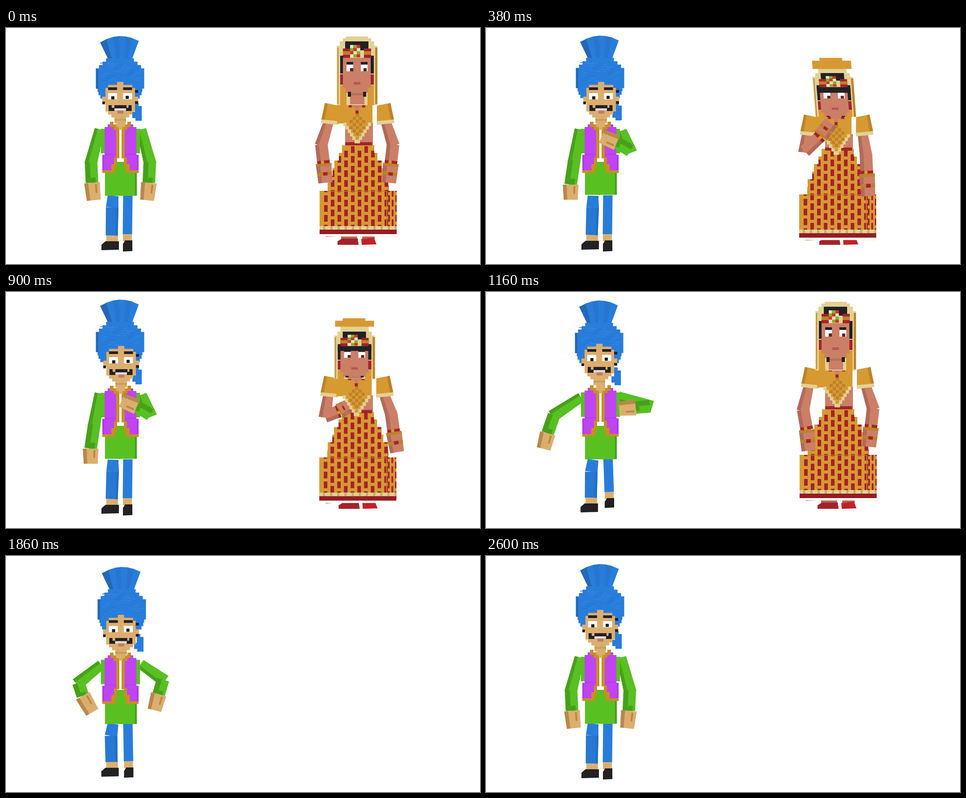
Write an HTML page with a canvas that moves like this. It is 1058 px wide and 529 px high and loops after 2620 ms.

```html
<!DOCTYPE html>
<html>
<head>
<meta charset="utf-8">
<title>Two dancers</title>
<style>
html, body { margin: 0; width: 100%; height: 100%; overflow: hidden; background: #fff; }
canvas { display: block; width: 100vw; height: 100vh; }
</style>
</head>
<body>
<canvas id="stage" width="1058" height="529"></canvas>
<script>
const LOOP = 2620, WOMAN_END = 1300;
const g = document.getElementById('stage').getContext('2d');
const BLUE = '#287ddb', NAVY = '#2269b8', GREEN = '#58c021', MOSS = '#45a11a', PURPLE = '#c044f2',
  GOLD = '#c6901f', SKIN = '#dcae6e', TAN = '#b88849', BLACK = '#222124',
  ORANGE = '#d79932', OCHRE = '#bd822a', CREAM = '#e3d194', RED = '#a6222a', ROSE = '#cb7f67', CLAY = '#b3695a';

function poly(color, ...p) {
  g.fillStyle = color;
  g.beginPath();
  for (let i = 0; i < p.length; i += 2) g.lineTo(p[i], p[i + 1]);
  g.fill();
}
function rect(color, ...boxes) {
  g.fillStyle = color;
  for (let i = 0; i < boxes.length; i += 4) g.fillRect(...boxes.slice(i, i + 4));
}
// Centred rows of blocks, given by half width.
function rows(color, cx, y, h, halves) {
  g.fillStyle = color;
  g.beginPath();
  halves.forEach((w, i) => g.rect(cx - w, y + i * h, w * 2, h + .3));
  g.fill();
}
function placed(x, y, draw, lean = 0) {
  g.save();
  g.transform(1, 0, lean, 1, x, y);
  draw();
  g.restore();
}
function twin(cx, draw) {
  draw();
  g.save();
  g.transform(-1, 0, 0, 1, 2 * cx, 0);
  draw();
  g.restore();
}
const mix = (a, b, k) => a + (b - a) * k;
const mirror = (points, cx) => points.map((v, i) => i % 2 ? v : 2 * cx - v);

// Returns a painter for any part of a tapered block: u runs across it, v along it.
function block(x0, y0, x1, y1, w0, w1, extra = 0) {
  const len = Math.hypot(x1 - x0, y1 - y0), dx = (x1 - x0) / len, dy = (y1 - y0) / len;
  const at = (u, v) => {
    const d = v * (len + extra), w = mix(w0, w1, v) * (.5 - u);
    return [x0 + dx * d - dy * w, y0 + dy * d + dx * w];
  };
  return (color, u0 = 0, u1 = 1, v0 = 0, v1 = 1) =>
    poly(color, ...at(u0, v0), ...at(u1, v0), ...at(u1, v1), ...at(u0, v1));
}
// arm = shoulder, elbow, wrist, fingertips
function upperArm(a, light, dark, bend) {
  const paint = block(...a.slice(0, 4), 22, 28, bend);
  paint(light);
  paint(dark, 0, .3);
}
const foreArm = a => block(...a.slice(2, 6), 28, 28);
const fist = a => block(...a.slice(4, 8), 35, 31);

// Keys interpolate with monotone cubics, so held poses never overshoot.
function sample(keys, t) {
  let i = 0;
  while (i < keys.length - 2 && t > keys[i + 1][0]) i++;
  const [t0, a] = keys[i], [t1, b] = keys[i + 1];
  const [tp, p] = keys[i - 1] || keys[i], [tn, n] = keys[i + 2] || keys[i + 1];
  const h = t1 - t0, u = Math.min(1, (t - t0) / h);
  const tangent = (x, y) => x * y > 0 ? 2 * x * y / (x + y) : 0;
  const out = {};
  for (const k in a) out[k] = a[k].map((v, j) => {
    const d = (b[k][j] - v) / h;
    const m0 = tangent(tp < t0 ? (v - p[k][j]) / (t0 - tp) : 0, d);
    const m1 = tangent(d, tn > t1 ? (n[k][j] - b[k][j]) / (tn - t1) : 0);
    return mix(v, b[k][j], u * u * (3 - 2 * u)) + h * u * (1 - u) * (m0 * (1 - u) - m1 * u);
  });
  return out;
}

// ---- man ----
// hat, face: offset; body: vest drop, hem y
// legs: left knee, left ankle, right hip y, right ankle, extra shoe length
const hang = [209, 227, 190, 301, 192, 347, 196, 386];
const bent = [210, 249, 161, 287, 175, 324, 190, 360];
const idle = {
  hat: [0, 0], face: [0, 0], body: [0, 377], legs: [237, 402, 236, 465, 376, 271, 462, 0],
  armL: hang, armR: mirror(hang, 255.5)
};
const chest = { ...idle,
  hat: [0, -1], face: [2, 0], body: [0, 375], legs: [238, 402, 236, 464, 375, 271, 462, 0],
  armL: [209, 227, 197, 297, 189, 351, 189, 385], armR: [303, 230, 322, 275, 292, 257, 258, 243]
};
const step = {
  hat: [-2, 1], face: [-2, -5], body: [-1, 376], legs: [235, 403, 234, 461, 362, 275, 448, -3],
  armL: [212, 236, 152, 276, 138, 317, 129, 352], armR: [296, 234, 366, 256, 334, 259, 297, 262]
};
const reach = { ...step, armL: [212, 236, 138, 262, 106, 290, 84, 308] };
const crouch = {
  hat: [3, 18], face: [-1, 25], body: [11, 383], legs: [230, 411, 233, 460, 372, 277, 459, 14],
  armL: bent, armR: mirror(bent, 254)
};
const akimbo = {
  hat: [4, 5], face: [2, 9], body: [6, 377], legs: [235, 402, 236, 462, 371, 273, 460, -4],
  armL: [213, 243, 162, 284, 171, 312, 193, 349], armR: [301, 241, 351, 276, 342, 308, 333, 344]
};
const manKeys = [[0, idle], [320, chest], [990, chest], [1160, step], [1270, reach],
  [1540, crouch], [1640, crouch], [1920, akimbo], [2180, akimbo], [2560, idle], [LOOP, idle]];

function turban() {
  for (let i = 0; i < 6; i++) {
    const x = k => 210 + k * 14.3, y = k => 18 + (k - 3.2) ** 2 * 1.4, foot = k => 228 + k * 8.8;
    poly(i == 0 ? NAVY : i % 2 ? BLUE : '#2676d0',
      x(i), y(i), x(i + 1) + .5, y(i + 1), foot(i + 1) + .5, 70, foot(i), 70);
  }
  rect(BLUE, 288, 168, 8, 20, 289, 175, 14, 33, 282, 188, 8, 14);
  rows(BLUE, 254.5, 68, 7.5, [31, 39, 47, ...Array(6).fill(54), 50, 48, 44]);
  rect(NAVY, 201, 91, 5, 45);
  for (let i = 0; i < 30; i++)
    rect(i % 3 ? '#3587df' : '#2474cf', 210 + i * 37 % 82, 78 + i * 19 % 44, 8 + i % 4 * 3, 1.5);
}
function manFace() {
  rows(SKIN, 255, 121, 6.6, [7, 27, 33, 33, 33, 40, 40, 33, 33, 33, 27, 20, 13, 13]);
  rect('#c99a5a', 242, 204, 26, 4);
  rect(BLACK, 288, 139, 7, 6, 288, 164, 7, 6, 215, 165, 6, 6, 242, 173, 27, 7);
  twin(254.7, () => {
    rect(BLACK, 228, 133, 20, 6, 229, 173, 7, 13, 235, 179, 7, 7);
    rect('#fff', 228, 146, 20, 14);
  });
  rect(BLACK, 235, 153, 7, 7, 267, 152, 7, 7);
  rect('#e0d8d4', 242, 180, 26, 5);
  rect('#c27b61', 249, 185, 13, 7);
}
function vest() {
  twin(255.5, () => {
    rect(GREEN, 212, 226, 10, 55);
    rect(GOLD, 232, 210, 8, 18, 239, 216, 8, 12, 246, 222, 7, 70, 241, 288, 7, 24, 235, 305, 9, 20, 215, 318, 28, 7);
    rect(PURPLE, 227, 216, 6, 8, 220, 222, 20, 62, 239, 228, 7, 62, 215, 284, 26, 21, 215, 304, 20, 15);
    rect('#b13de0', 215, 285, 4, 34, 220, 282, 26, 2);
  });
  rect(SKIN, 246, 208, 20, 14, 252, 220, 8, 8);
}
function shoe(x, y, w, h, toe) {
  poly(BLACK, x - toe, y + 8, x + 4, y, x + w, y, x + w, y + h, x - toe, y + h + 1);
}
function man(p) {
  const [kx, ky, ax, ay, hip, rx, ry, long] = p.legs, [drop, hem] = p.body;
  rect(SKIN, ax - 12, ay, 26, 16, rx - 10, ry, 20, 16);
  shoe(ax - 18, ay + 13, 34, 19, 5);
  shoe(rx - 9, ry + 14, 20, 24 + long, 1);
  const thigh = block(239, 376, kx, ky, 24, 28), shin = block(kx, ky, ax, ay, 28, 27);
  thigh(BLUE);
  shin('#2778d2');
  shin('#246fc4', .8);
  block(272, hip, rx, ry, 21, 21)(BLUE);
  upperArm(p.armL, GREEN, MOSS, 5);
  upperArm(p.armR, GREEN, MOSS, 5);
  rect(GREEN, 221, 300, 71, hem - 301);
  rect(MOSS, 288, 325 + drop, 4, hem - 327 - drop);
  placed(0, drop, vest);
  placed(...p.hat, turban);
  placed(...p.face, manFace);
  for (const a of [p.armL, p.armR]) {
    const fore = foreArm(a), hand = fist(a);
    fore(GREEN);
    fore(MOSS, 0, .4);
    fore(MOSS, .4, .8, .75);
    hand(SKIN);
    hand(TAN, 0, .25);
    hand(TAN, .68, .8, .1, .6);
  }
}

// ---- woman ----
// head: x, y, bow, lean; body: bust drop, skirt drop, feet x
const low = [721, 208, 704, 261, 709, 304, 713, 347];
const stand = { head: [0, 0, 0, 0], body: [0, 0, 0], armL: low, armR: mirror(low, 784) };
const shy = {
  head: [3, 0, 1, 10], body: [26, 8, 4],
  armL: [718, 230, 711, 275, 746, 241, 769, 211], armR: [841, 235, 848, 284, 850, 327, 853, 377]
};
const blush = {
  head: [0, 0, 1, 0], body: [24, 7, 3],
  armL: [720, 230, 713, 282, 750, 258, 773, 234], armR: [839, 235, 852, 283, 859, 323, 866, 371]
};
const sway = { ...blush, armR: [841, 231, 858, 279, 867, 318, 877, 364] };
const settle = { ...stand, head: [-3, 3, 0, 0], armL: [721, 208, 708, 264, 716, 309, 720, 356] };
const womanKeys = [[0, stand], [340, shy], [640, blush], [820, sway], [1120, settle], [LOOP, settle]];

function womanHead(bow) {
  // Bowing stretches the crown and squeezes the face downwards.
  const fold = y => {
    const low = y < 30 ? 67 + (y - 19) * 3.1 : Math.min(199, 101 + (y - 30) * .85);
    return mix(y, low, bow);
  };
  const box = (color, x, y, w, h) => rect(color, x - 6 * bow, fold(y), w, fold(y + h) - fold(y));
  const pair = (color, x, y, w, h) => {
    box(color, x, y, w, h);
    box(color, 1567 - x - w, y, w, h);
  };
  for (const [inset, y] of [[21, 19], [14, 23], [7, 30], [0, 40]])
    box(CREAM, 738 + inset, y, 91 - inset * 2, 133);
  box(ORANGE, 757, 19, 50, 8 * bow);
  box(ORANGE, 740, 21, 87, 6 * bow);
  box(OCHRE, 740, 44, 2, 126);
  box(OCHRE, 824, 44, 5, 126);
  pair(ORANGE, 746, 128, 14, 45);
  box(BLACK, 757, 30, 52, 20);
  pair(BLACK, 746, 62, 14, 40);
  pair(RED, 746, 104, 8, 23);
  pair(RED, 752, 46, 16, 21);
  pair(OCHRE, 752, 52, 16, 8);
  box(ROSE, 768, 140, 32, 31);
  box(ROSE, 752, 67, 62, 67);
  box(ROSE, 758, 133, 50, 12);
  box('#b66f5a', 768, 146, 32, 5);
  if (bow) box(BLACK, 746, 67, 75, 15 * bow);
  const gems = ['#efe4bd', '#79b52f', '#e22d25'];
  for (let i = 0; i < 12; i++)
    box(gems[(i + (i / 3 | 0)) % 3], 768 + i % 3 * 7.5, 38 + (i / 3 | 0) * 7, 7.6, 7);
  pair(BLACK, 760, 76, 15, 6);
  pair('#fff', 760, 82, 15, 15);
  box('#572522', 768, 90, 7, 7);
  box('#572522', 798, 90, 7, 7);
  box('#b95556', 776, 121, 15, 6);
  pair(BLACK, 763, 143, 7, 11);
}
function bust() {
  twin(785, () => {
    poly(ORANGE, 712, 168, 742, 174, 742, 210, 704, 207);
    poly(OCHRE, 712, 168, 718, 170, 711, 207, 704, 205);
    poly(CREAM, 704, 205, 743, 209, 742, 217, 703, 213);
  });
  rect(ORANGE, 739, 172, 79, 42);
  for (let i = 0; i < 6; i++) {
    const half = 31 - i * 5, y = 212 + i * 7.7;
    rect(CREAM, 784 - half, y, half * 2, 8);
    if (i < 5) rect(ORANGE, 791 - half, y, half * 2 - 14, 8);
  }
  for (let r = 0; r < 7; r++)
    for (let c = -2; c <= 2; c++)
      if ((r + c) % 2 == 0 && Math.abs(c) + Math.abs(r - 3) < 5) rect(OCHRE, 781 + c * 7, 192 + r * 7, 7, 7);
  rows(ROSE, 784, 164, 7, [19, 14, 7]);
  for (let i = -3; i < 4; i++) rect(i % 2 ? ORANGE : RED, 780 + i * 7.5, 185 - Math.abs(i) * 7, 7, 7);
}
function skirt() {
  poly('#3b1518', 702, 460, 871, 460, 868, 466, 800, 464, 715, 468);
  g.save();
  rows(ORANGE, 786, 263, 17, [36, 43, 53, 57, 67, 68, ...Array(6).fill(86)]);
  g.clip();
  for (let i = 0; i < 14; i++) {
    // columns crowd together on the side face
    const x = 710 + 15 * Math.min(i, 9) + 8 * Math.max(0, i - 9), w = i > 9 ? 4 : 8;
    for (let y = 265 + i % 2 * 10; y < 444; y += 22) rect(RED, x, y, w, 15);
  }
  rect(OCHRE, 849, 366, 2, 78, 716, 365, 134, 1.5);
  rect(CREAM, 700, 444, 174, 8);
  for (let x = 708; x < 873; x += 16) rect('#c6ad68', x, 444, 5, 8);
  rect('#941d24', 700, 452, 174, 10);
  rect('#fff', 700, 462, 174, 6);
  g.restore();
}
function woman(p) {
  const [drop, low, feet] = p.body, [hx, hy, bow, lean] = p.head;
  placed(feet, 0, () => {
    rect(CLAY, 748, 461, 36, 14, 795, 461, 28, 12);
    poly(RED, 740, 478, 750, 472, 785, 472, 787, 486, 740, 486);
    poly('#c51f28', 793, 473, 821, 470, 827, 485, 794, 486);
  });
  rect(ROSE, 757, 212 + drop, 62, 52 + low - drop);
  placed(-low / 8, low, skirt);
  rect(RED, 757, 256 + low * 1.5, 60, 7);
  upperArm(p.armL, ROSE, CLAY, 3);
  upperArm(p.armR, ROSE, CLAY, 3);
  placed(-drop / 12, drop, bust);
  placed(hx - lean * 1.56, hy, () => womanHead(bow), lean / 125);
  for (const a of [p.armL, p.armR]) {
    const fore = foreArm(a), hand = fist(a);
    fore(ROSE);
    fore(CLAY, 0, .3);
    hand(ROSE);
    hand(CLAY, 0, .25);
    fore(RED, 0, 1, .84);
    fore(ORANGE, .3, .55, .84);
    hand(OCHRE, 0, 1, 0, .14);
    hand(OCHRE, 0, 1, .45, .62);
    hand(RED, .4, .7, .45, .62);
  }
}

const start = performance.now();
function frame(now) {
  const t = Math.max(0, now - start) % LOOP;
  g.fillStyle = '#fff';
  g.fillRect(0, 0, 1058, 529);
  man(sample(manKeys, t));
  if (t < WOMAN_END) woman(sample(womanKeys, t));
  requestAnimationFrame(frame);
}
frame(start);
</script>
</body>
</html>
```
